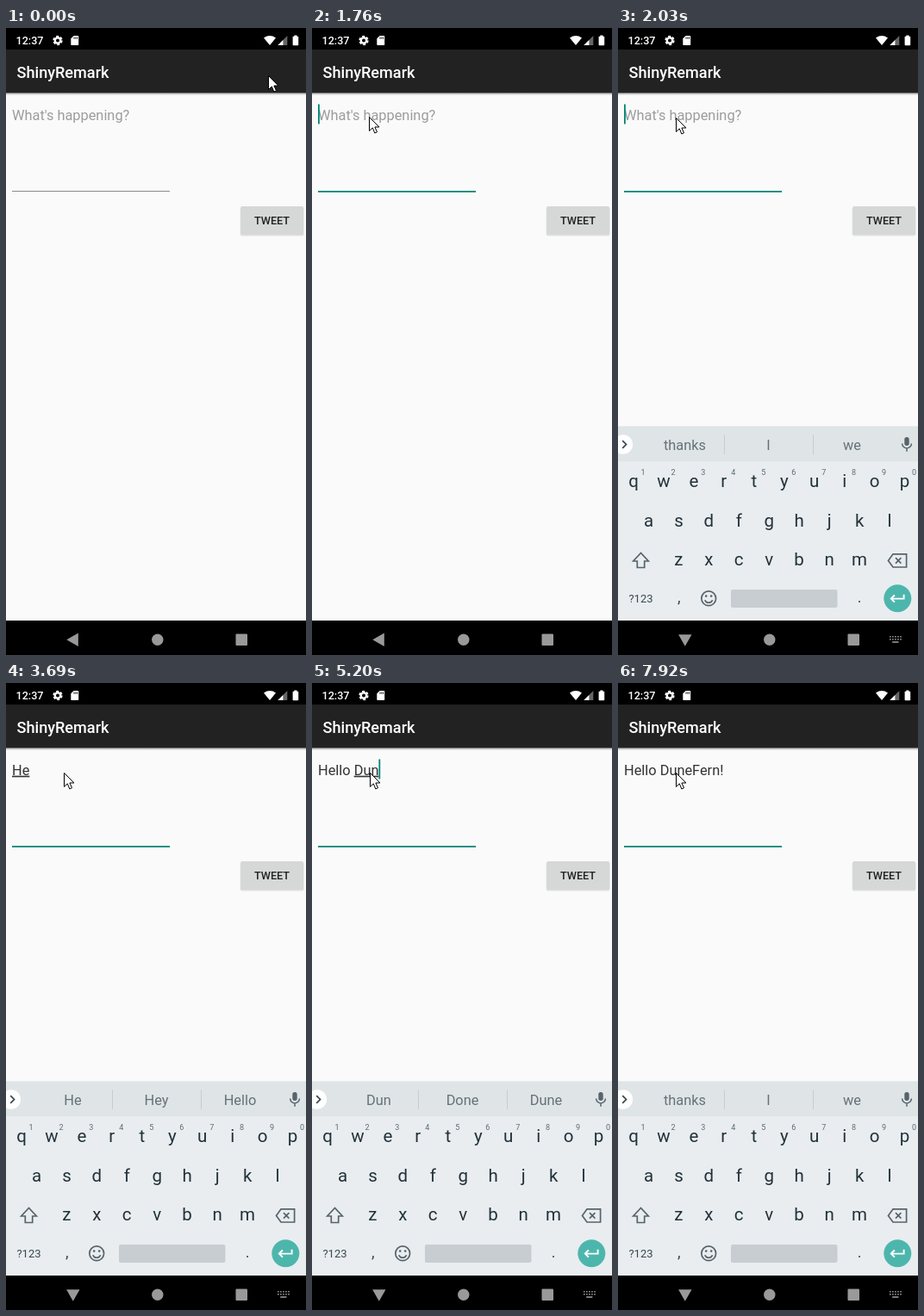
Animation, 348 px wide and 728 px high, one loop 8 s. Source, as an HTML page:

```html
<!DOCTYPE html>
<html lang="en">
<head>
<meta charset="utf-8">
<title>Composing a message</title>
<style>
  html, body { margin: 0; width: 100%; height: 100%; overflow: hidden; background: #fafafa; }
  svg { display: block; width: 100vw; height: 100vh; font-family: Roboto, sans-serif; }
  text { white-space: pre; }
  .medium { font-weight: 500; }
  .mid { text-anchor: middle; }
  .line { fill: none; stroke: #56646b; stroke-width: 1.7; }
  .composing { text-decoration: underline; }
</style>
</head>
<body>
<svg viewBox="0 0 348 728">
  <defs>
    <linearGradient id="shade" x2="0" y2="1">
      <stop stop-color="#000" stop-opacity=".28"/>
      <stop offset="1" stop-color="#000" stop-opacity="0"/>
    </linearGradient>
  </defs>
  <rect width="348" height="728" fill="#fafafa"/>

  <!-- Status bar -->
  <rect width="348" height="25.5"/>
  <g fill="#fff">
    <text class="medium" x="11.5" y="19" font-size="12.6">12:37</text>
    <g fill="none" stroke="#fff">
      <circle cx="60" cy="14.5" r="3.2" stroke-width="2.4"/>
      <circle cx="60" cy="14.5" r="4.8" stroke-width="1.7" stroke-dasharray="3 2.03"/>
    </g>
    <path d="M78.6 9H83.4Q84.2 9 84.2 9.8V19.2Q84.2 20 83.4 20H76.1Q75.3 20 75.3 19.2V12.3Z"/>
    <path d="M79 10.5v2.2M80.8 10.5v2.2M82.6 10.5v2.2" stroke="#000" stroke-width=".9"/>
    <path d="M299 11.4Q306 6.6 313 11.4L306 20Z"/>
    <path d="M326.3 9V20H315.3Z" fill="#666"/>
    <path d="M321.4 13.9V20H315.3Z"/>
    <rect x="332.6" y="9.8" width="6.6" height="10.4" rx=".8"/>
    <rect x="334.3" y="8.5" width="3.2" height="2"/>
  </g>

  <!-- App bar -->
  <rect y="25" width="348" height="50.5" fill="#222"/>
  <rect y="75.5" width="348" height="3" fill="url(#shade)"/>
  <text class="medium" x="12.6" y="57.5" font-size="18.1" fill="#fff">ShinyRemark</text>

  <!-- Message field -->
  <rect id="rule" x="7" y="189" width="183" height="1"/>
  <text id="hint" x="7" y="106.7" font-size="16.35" fill="#9c9c9c">What's happening?</text>
  <text id="message" x="7" y="106.7" font-size="16.35" fill="#333"><tspan id="done"></tspan><tspan id="word" class="composing"></tspan></text>
  <rect id="caret" width="1.8" height="23" fill="#008577"/>

  <!-- Button -->
  <rect x="271.6" y="207.4" width="74" height="34" rx="2.5" fill="#000" opacity=".1"/>
  <rect x="272.2" y="207" width="72.8" height="33" rx="2" fill="#d6d7d7"/>
  <text class="medium mid" x="308.5" y="228.3" font-size="12.7" fill="#212121">TWEET</text>

  <!-- Keyboard -->
  <g id="keyboard">
    <rect y="462.5" width="348" height="266" fill="#e9edf0"/>
    <rect y="462.5" width="348" height="40.5" fill="#dfe4e7"/>
    <path d="M123.5 472.5V495M226.5 472.5V495" stroke="#c6ccd0"/>
    <circle cx="5.8" cy="483.5" r="11.3" fill="#fff"/>
    <path class="line" d="M5.2 479.2l4.3 4.3-4.3 4.3" style="stroke:#37474f"/>
    <rect x="332.3" y="475" width="5.4" height="10" rx="2.7" fill="#56646b"/>
    <path class="line" d="M329.6 482.5a5.4 5.4 0 0 0 10.8 0M335 488v3.7" style="stroke-width:1.5"/>
    <g id="suggestions" class="mid" font-size="16.35" fill="#667277"></g>
    <g id="keys" class="mid" font-size="20.5" fill="#22323a"></g>
    <g id="digits" class="mid" font-size="9" fill="#5d6a70"></g>
    <path class="line" d="M26.5 609.5L17.7 619H22.3V626.5H30.7V619H35.3Z"/>
    <path class="line" d="M319 610.8H334.6V626H319L313.5 618.4ZM322 615.2l6.4 6.4m0-6.4l-6.4 6.4"/>
    <text class="mid" x="26.5" y="667" font-size="13" fill="#37474f">?123</text>
    <g class="mid" font-size="18" fill="#37474f">
      <text x="70.7" y="667">,</text>
      <text x="280" y="667">.</text>
    </g>
    <circle class="line" cx="105.2" cy="662.3" r="8.4"/>
    <path class="line" d="M100.8 664.2a4.7 4.7 0 0 0 8.8 0"/>
    <circle cx="102.2" cy="659.6" r="1.3" fill="#56646b"/>
    <circle cx="108.2" cy="659.6" r="1.3" fill="#56646b"/>
    <rect x="131" y="652" width="123.5" height="21" rx="2" fill="#c8cdd1"/>
    <circle cx="324.3" cy="662.3" r="16" fill="#4db6ac"/>
    <path class="line" d="M331.6 657.8v4.8H317M320.9 658.5l-4.1 4.1 4.1 4.1" style="stroke:#fff;stroke-width:1.9"/>
  </g>

  <!-- Navigation bar -->
  <rect y="688" width="348" height="40"/>
  <g fill="#999">
    <path id="back" d="M-7.5 0L6 -7.7V7.7Z"/>
    <circle cx="175.8" cy="710.2" r="6.7"/>
    <rect x="266.5" y="703.5" width="13.5" height="13.5" rx="1"/>
  </g>
  <g id="switcher" stroke="#999" stroke-width="1.6">
    <path d="M315 706.8H329M315 709.8H329" stroke-dasharray="1.6 1.45"/>
    <path d="M318.2 713H325.4"/>
  </g>

  <path id="pointer" d="M0 0V16L3.8 12.4L6.3 18.5L9 17.3L6.4 11.5H11.4Z" fill="#fff" stroke="#000" stroke-linejoin="round"/>
</svg>

<script>
const LOOP = 8000, FOCUS = 1760, RISING = 1890, RAISED = 2030;
const PREDICTIONS = "thanks|I|we";

// [start time, typed text, suggestions, caret visible]
const steps = [
  [0, "", PREDICTIONS, false],
  [FOCUS, "", PREDICTIONS, true],
  [2280, "", PREDICTIONS, false],
  [2710, "", PREDICTIONS, true],
  [2990, "H", PREDICTIONS, true],
  [3130, "H", "H|Hi|Have", true],
  [3260, "He", "He|Hey|Hello", true],
  [3690, "He", "He|Hey|Hello", false],
  [3830, "Hel", "Hel|Hello|Help", true],
  [3980, "Hell", "Hell|Hello|He'll", true],
  [4130, "Hello", "Hello|Hello!|Hellos", true],
  [4500, "Hello ", "my|and|there", true],
  [4910, "Hello D", "D|Do|Did", true],
  [5050, "Hello Du", "Du|Due|Dude", true],
  [5200, "Hello Dun", "Dun|Done|Dune", true],
  [5450, "Hello Dune", "Dune|Done|Dunes", true],
  [5570, "Hello DuneF", "DuneF|Dune|Dunes", true],
  [5840, "Hello DuneFe", "DuneFe|Dune|Dunes", true],
  [6000, "Hello DuneFer", "DuneFer|Dune|Dune Fern", true],
  [6150, "Hello DuneFern", "DuneFern|Dunefern|Dune Fern", true],
  [6360, "Hello DuneFern", "DuneFern|Dunefern|", true],
  [6640, "Hello DuneFern!", PREDICTIONS, true],
  [7080, "Hello DuneFern!", PREDICTIONS, false],
  [7370, "Hello DuneFern!\n", PREDICTIONS, true],
  [7920, "Hello DuneFern!\n", PREDICTIONS, false]
];

const el = id => document.getElementById(id);
const show = (id, visible) => el(id).setAttribute("visibility", visible ? "visible" : "hidden");
const place = (id, x, y, extra = "") => el(id).setAttribute("transform", `translate(${x} ${y}) ${extra}`);

function addText(parent, x, y, content = "") {
  const node = document.createElementNS("http://www.w3.org/2000/svg", "text");
  node.setAttribute("x", x);
  node.setAttribute("y", y);
  node.textContent = content;
  return el(parent).appendChild(node);
}

const PITCH = 34.95;
[["qwertyuiop", 18, 533], ["asdfghjkl", 35.5, 578.5], ["zxcvbnm", 70.3, 624]].forEach(([row, x, y]) =>
  [...row].forEach((key, i) => addText("keys", x + i * PITCH, y, key)));
[..."1234567890"].forEach((digit, i) => addText("digits", 29 + i * PITCH, 519, digit));
const slots = [77.5, 174.5, 271.5].map(x => addText("suggestions", x, 490));

function pointerAt(t) {
  if (t < 130) return [304.5, 55.5];
  if (t < 280) return [293, 57.5];
  if (t < 970) return [280.5, 59.5];
  if (t >= RISING) return [67.5, 104.5];
  const p = Math.min(1, (Math.floor((t - 970) / 131.5) + 1) / 7);
  const eased = p * p * (3 - 2 * p);
  return [280.5 - 214 * eased, 59.5 + 44 * eased];
}

function drawMessage([, typed, suggestions, caretOn]) {
  const [line, nextLine] = typed.split("\n");
  const split = /[ !]$/.test(line) ? line.length : line.lastIndexOf(" ") + 1;
  el("done").textContent = line.slice(0, split);
  el("word").textContent = line.slice(split);
  show("hint", !typed);
  show("caret", caretOn);
  if (nextLine === undefined) place("caret", 7 + (line ? el("message").getComputedTextLength() : 0), 88.5);
  else place("caret", 7, 109.5);
  suggestions.split("|").forEach((word, i) => slots[i].textContent = word);
}

let current;
function draw(t) {
  const step = steps.findLast(([start]) => start <= t);
  if (step !== current) drawMessage(current = step);

  const focused = t >= FOCUS, raised = t >= RAISED;
  el("rule").setAttribute("fill", focused ? "#008577" : "#8b8b8b");
  el("rule").setAttribute("height", focused ? 1.8 : 1);

  show("keyboard", t >= RISING);
  place("keyboard", 0, raised ? 0 : 40);
  show("switcher", raised);
  const turn = raised ? -90 : t >= RISING ? -60 : 0;
  place("back", 77.8, 710.2, `rotate(${turn})`);
  place("pointer", ...pointerAt(t));
}

const begin = performance.now();
function tick() {
  draw((performance.now() - begin) % LOOP);
  requestAnimationFrame(tick);
}
tick();
</script>
</body>
</html>
```
